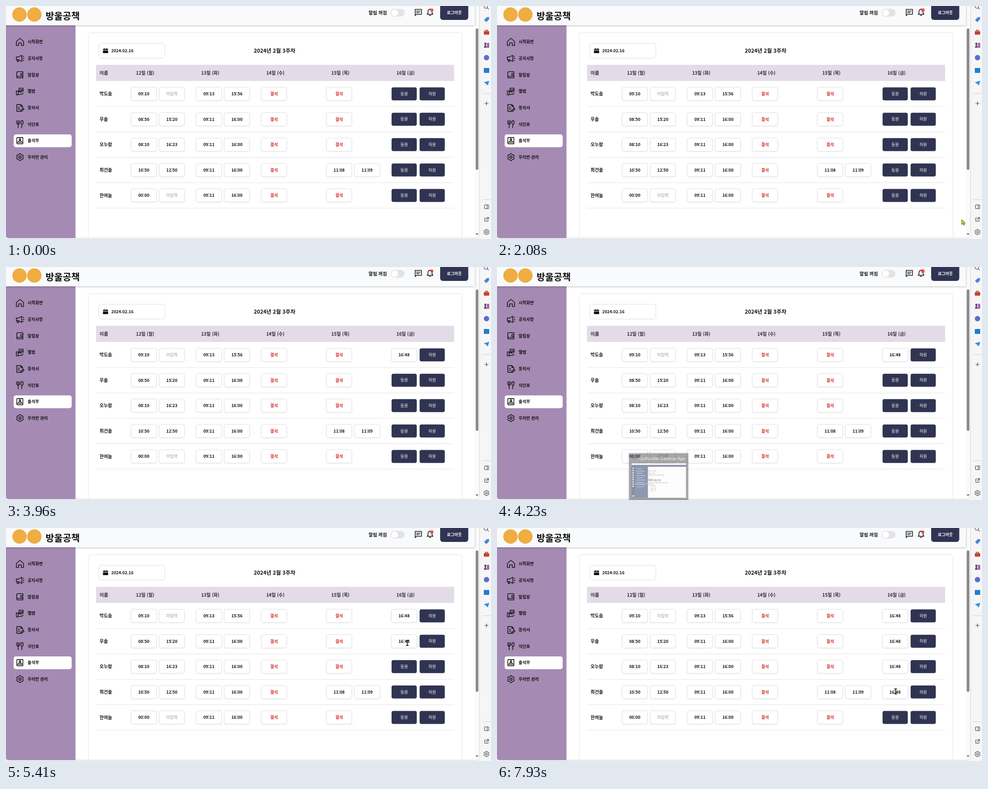
Animation, 1078 px wide and 519 px high, one loop 8 s. Source, as an HTML page:

```html
<!DOCTYPE html>
<html lang="ko">
<head>
<meta charset="utf-8">
<title>출석부</title>
<style>
  html, body { margin: 0; width: 100%; height: 100%; overflow: hidden; background: #fff; }
  svg { display: block; width: 1078px; height: 519px; }
  text { font: 700 9.2px "Noto Sans CJK KR", "Noto Sans CJK", sans-serif; fill: #111; }
  .mid { text-anchor: middle; }
  .icon { fill: none; stroke: #161616; stroke-width: 1.6; stroke-linecap: round; stroke-linejoin: round; }
  .thin { stroke-width: 1.1; }
  .box { fill: #fff; stroke: #dedee3; filter: drop-shadow(0 1px 1px #0001); }
  .dark { fill: #303452; }
  .line { stroke: #e4e4e8; }
  .tiny { font-size: 3px; fill: #555; font-weight: 400; }
  #ping { transform-box: fill-box; transform-origin: center; }
</style>
</head>
<body>
<svg viewBox="0 0 1078 519">
  <!-- window -->
  <rect width="1078" height="519" fill="#f6f6f7"/>
  <path d="M0 0H1052.5V511Q1052.5 517 1046 517H6Q0 517 0 511Z" fill="#fff" stroke="#d5d5d9"/>
  <rect x="1042" width="10" height="515" fill="#fafafa"/>
  <rect x="1044" y="50" width="6" height="315" rx="3" fill="#8b8b8b"/>
  <path d="M1043.5 506.500H1050.500L1047 510.500Z" fill="#777"/>
  <path d="M183 516.500V64.500Q183 59.500 188 59.500H1008.500Q1013.500 59.500 1013.500 64.500V516.500" fill="none" class="line"/>
  <path d="M0 43H154.500V517H6Q0 517 0 511Z" fill="#a58ab3"/>
  <rect x="-5" y="-5" width="1047" height="48" fill="#f8fafc" style="filter:drop-shadow(0 1px 2px #0004)"/>

  <!-- header -->
  <circle cx="30" cy="19" r="16" fill="#efad42"/>
  <circle cx="63" cy="19" r="16" fill="#efad42"/>
  <text x="88" y="30" style="font-size:20.7px">방울공책</text>
  <text x="806" y="18.500" style="font-size:10.3px">알림 꺼짐</text>
  <rect x="855" y="6.500" width="31" height="17" rx="8.500" fill="#e3e3e5"/>
  <circle cx="864" cy="15" r="8" fill="#fff" stroke="#ddd"/>
  <g class="icon">
    <path d="M909.500 21.500V7.500H923.500V18.500H912.500ZM912.500 11.500H920.500M912.500 14.800H918.500"/>
    <path d="M936 18.500H949L947 16V12Q947 7.500 942.500 7.500T938 12V16ZM940.500 20.800H944.500M942.500 6.500V7.500"/>
  </g>
  <circle cx="946.500" cy="9" r="3.300" fill="#e8463a"/>
  <circle id="ping" cx="946.500" cy="9" r="3.300" fill="#ee5548"/>
  <rect class="dark" x="965" y="-8" width="62.500" height="39" rx="6"/>
  <text class="mid" x="996.500" y="18" fill="#fff" style="fill:#fff;font-size:9px">로그아웃</text>

  <rect x="17" y="286" width="129" height="28.500" rx="5" fill="#fff"/>
  <g id="nav"></g>

  <!-- table head -->
  <rect x="206.500" y="83" width="146.500" height="33" rx="5" fill="#fff" stroke="#dcdce0"/>
  <path d="M215.500 96V95.500H218V94H219.500V95.500H223V94H224.500V95.500H227V98H215.500ZM215.500 99H227V105H215.500Z" fill="#161616"/>
  <text x="234" y="103.300">2024.02.16</text>
  <text class="mid" x="597" y="104.300" style="font-size:11.900px">2024년 2월 3주차</text>
  <rect x="200" y="131" width="796" height="36" fill="#e3dce8"/>
  <g id="table"></g>

  <!-- browser side bar -->
  <circle cx="1066.500" cy="1" r="4" class="icon" style="stroke:#6d6685"/>
  <path d="M1069.500 4L1072.500 7" class="icon" style="stroke:#6d6685"/>
  <path d="M1062.500 31L1068.500 25L1074 24.500L1073.500 30L1067.500 36Z" fill="#4a86dd"/>
  <path d="M1065.500 56V54H1070.500V56" class="icon" style="stroke:#9b3a2a"/>
  <rect x="1062" y="56" width="12" height="8" rx="1" fill="#cf4e35"/>
  <path d="M1062 59.500H1074" stroke="#8d2d20"/>
  <circle cx="1065.500" cy="84" r="2.500" fill="#5c5566"/>
  <path d="M1062 93L1064.500 86H1066.500L1069 93Z" fill="#5c5566"/>
  <path d="M1069 93V82H1074V93Z" fill="#b15cb0"/>
  <circle cx="1068" cy="115" r="6" fill="#5b6fc9"/>
  <rect x="1062" y="138" width="12" height="11" rx="1" fill="#1f7fd0"/>
  <path d="M1062 170L1074 166.500L1071 177L1067.500 173.500Z" fill="#2b8fe0"/>
  <path d="M1059 195H1078M1059 431.500H1078" stroke="#cfcfd3"/>
  <g class="icon thin" style="stroke:#3a3a3a">
    <path d="M1064 217H1072M1068 213V221"/>
    <rect x="1063.500" y="443" width="9.500" height="8.500" rx="1.500"/><path d="M1069.500 443V451.500"/>
    <path d="M1067 472H1065Q1064 472 1064 473V478.500Q1064 479.500 1065 479.500H1070.500Q1071.500 479.500 1071.500 478.500V476.500M1069 471H1072.500V474.500M1072.500 471L1067.500 476"/>
    <g id="sideGear"></g>
  </g>

  <g id="tip">
    <rect x="1057.500" y="511.500" width="30" height="14" fill="#fbfbfb" stroke="#dadada"/>
    <text x="1061" y="521" style="font-weight:400;fill:#777">정지</text>
  </g>

  <!-- task preview -->
  <g id="preview">
    <rect x="293.500" y="415" width="131.500" height="110" fill="#505050" style="filter:drop-shadow(0 0 2px #0006)"/>
    <circle cx="305" cy="426" r="4.600" fill="#1e4a8c"/>
    <text x="316" y="430" style="font:400 9.200px 'Open Sans',sans-serif;fill:#fff">Quillander Desktop App</text>
    <rect x="299" y="437" width="121" height="77" fill="#fdfdfd"/>
    <rect x="299" y="437" width="121" height="4" fill="#e4e8ef"/>
    <rect x="299" y="441" width="121" height="4" fill="#1d2c55"/>
    <rect x="299" y="445" width="36.500" height="69" fill="#203764"/>
    <rect x="299" y="445" width="7" height="69" fill="#172849"/>
    <rect x="306" y="481" width="29" height="4" fill="#3b578c"/>
    <circle cx="303" cy="510" r="1.800" fill="#fff"/>
    <path d="M335.500 453H414M335.500 469H414M335 500H416M335 510H416" stroke="#eee" stroke-width=".6"/>
    <g id="previewText"></g>
  </g>

  <g id="cursor" stroke="#15180a" stroke-linejoin="round">
    <path id="arrow" d="M0 0V11L2.700 8.500L4.600 12.500L6.400 11.600L4.600 7.800H8Z" fill="#c6e812" stroke-width=".8"/>
    <path id="hand" d="M-1 1Q0-.5 1 1V5L4.500 5.800Q6 6.300 5.800 8L5 12.500H-.5L-3.600 8Q-3.500 6.500-1 8Z" fill="#c6e812" stroke-width="1"/>
    <g id="beam" fill="none">
      <path d="M-3-5.500H3M-3 5.500H3M0-5.500V5.500" stroke="#25290c" stroke-width="2"/>
      <path d="M0-4V4" stroke="#a9bd2c" stroke-width=".6"/>
    </g>
  </g>
</svg>
<script>
const LOOP = 8000;
const $ = id => document.getElementById(id);
const text = (x, y, s, size = 9.2, cls = '', fill = '#111', weight = 700) =>
  `<text x="${x}" y="${y + size * .36}" class="${cls}" style="font-size:${size}px;fill:${fill};font-weight:${weight}">${s}</text>`;

function gear(cx, cy, r) {
  const points = Array.from({ length: 48 }, (_, i) => {
    const a = i / 48 * 2 * Math.PI, q = r * (.9 + .1 * Math.cos(6 * a));
    return `${cx + q * Math.sin(a)},${cy + q * Math.cos(a)}`;
  });
  return `<polygon points="${points.join(' ')}"/><circle cx="${cx}" cy="${cy}" r="${r * .33}"/>`;
}

// Icons are drawn around their own centre.
const book = 'M-5-7H6.500V7H-5Q-7 7-7 5V-5Q-7-7-5-7M-7 4.500Q-6.500 3.500-5 3.500H6.500';
const nav = [
  ['시작화면', '<path d="M-8-1L0-8L8-1V8H3V2H-3V8H-8Z"/>'],
  ['공지사항', '<path d="M-8-3H-3L4-7V7L-3 3H-8ZM-6 3V7H-3V3M6.500-4L8-5M7 0H9M6.500 4L8 5"/>'],
  ['알림장', `<path d="${book}M6.500-3H2V1H6.500"/>`],
  ['앨범', '<path d="M-8-1H-4V8H-8ZM-4 7H4L7 4M-4 1H1L3 3M-2-7H7V0H-2ZM0-2L2-4L4-2L7-5"/>'],
  ['동의서', '<path d="M0 8H-7V-7H2L6-3V0M2-7V-3H6M-4-1H-1M-4 3H0M1 7L7 1L9 3L4 8H1Z"/>'],
  ['식단표', '<path d="M-7-8V-3Q-7 0-4 0T-1-3V-8M-4-8V8M4 8V1M4 1Q2-1 2-4T4.500-8T7-4T4 1"/>'],
  ['출석부', `<path d="${book}M-3 1.500Q0-2 3 1.500"/><circle cy="-3" r="1.700"/>`],
  ['우리반 관리', gear(0, 0, 7.8)]
];
$('nav').innerHTML = nav.map(([label, icon], i) => {
  const y = 80 + i * 36.65;
  return `<g class="icon" transform="translate(31 ${y})">${icon}</g>` + text(48, y, label);
}).join('');
$('sideGear').innerHTML = gear(1068, 503.5, 6);

const colX = i => 278 + i * 144.7;
const rowY = i => 195.7 + i * 56.55;
const timeBox = (x, y, s) => {
  const [fill, weight] = s === '결석' ? ['#d92727', 700] : s === '미입력' ? ['#999', 400] : ['#111', 700];
  return `<rect class="box" x="${x}" y="${y - 14.7}" width="56.500" height="29.500" rx="4"/>` +
    text(x + 28.3, y, s, 9.2, 'mid', fill, weight);
};
const button = (x, y, s) =>
  `<rect class="dark" x="${x}" y="${y - 14.5}" width="56" height="29" rx="4"/>` + text(x + 28, y, s, 9, 'mid', '#fff', 500);

const absent = ['결석'];
const rows = [
  ['박도솜', ['09:10', '미입력'], ['09:13', '15:56'], absent, absent],
  ['우솔', ['08:50', '15:20'], ['09:11', '16:00'], absent, absent],
  ['오누람', ['08:10', '16:23'], ['09:11', '16:00'], absent, absent],
  ['최건솔', ['10:50', '12:50'], ['09:11', '16:00'], absent, ['11:08', '11:09']],
  ['한여늘', ['00:00', '미입력'], ['09:11', '16:00'], absent, absent]
];
const head = text(208, 149, '이름', 10.3, '', '#2b2833') +
  ['월', '화', '수', '목', '금'].map((d, i) => text(colX(i) + 11, 149, `${12 + i}일 (${d})`, 10, '', '#2b2833')).join('');
$('table').innerHTML = head + rows.map(([name, ...days], r) => {
  const y = rowY(r);
  const cells = days.map((day, c) => day.map((s, k) => timeBox(colX(c) + k * 62.3, y, s)).join('')).join('');
  return `<path class="line" d="M200 ${y + 28.3}H996"/>` + text(208, y, name, 10) + cells +
    `<g id="in${r}">${button(857, y, '등원')}</g><g id="done${r}">${timeBox(856.5, y, '16:48')}</g>` +
    button(919.3, y, '하원');
}).join('');

const tiny = (x, y, s) => `<text class="tiny" x="${x}" y="${y}">${s}</text>`;
const side = Array.from({ length: 9 }, (_, i) =>
  `<rect x="301" y="${447 + i * 5}" width="3" height="3" fill="#ccd4e4"/><rect x="310" y="${449 + i * 5}" width="${13 + i * 5 % 9}" height="1" fill="#a8b6d2"/>`);
$('previewText').innerHTML = side.join('') +
  tiny(336, 456, '알림 안내 내용') + tiny(336, 461, '오늘의 공지') + tiny(336, 465, '내용을 확인하고 답해 주세요') +
  tiny(336, 473, '새 소식') + text(336, 476, '이번주 할일 안내', 4) +
  tiny(336, 482, '아래 목록을 차례대로 확인해 주세요') + tiny(336, 486, '감사합니다') +
  [490, 494.5, 499].map(y => tiny(340, y, '• 확인 목록')).join('');

// Timeline helpers
const play = (el, frames) => el.animate(
  frames.map(([t, props]) => ({ offset: t / LOOP, ...props })),
  { duration: LOOP, iterations: Infinity }).startTime = 0;

function show(el, ...spans) {
  const frames = [[0, 0]];
  for (const [from, to] of spans) {
    if (from === 0) frames[0][1] = 1; else frames.push([from, 1]);
    if (to < LOOP) frames.push([to, 0]);
  }
  frames.push([LOOP, frames.at(-1)[1]]);
  play(el, frames.map(([t, opacity]) => [t, { opacity, easing: 'step-end' }]));
}

const clicks = [3000, 5330, 6480, 7780, LOOP];
clicks.forEach((t, r) => {
  show($('in' + r), [0, t]);
  if (t < LOOP) show($('done' + r), [t, LOOP]);
  else $('done' + r).remove();
});

show($('tip'), [1100, 1940]);
play($('preview'), [[0, 0], [4160, 0], [4300, 1], [5000, 1], [5150, 0], [LOOP, 0]].map(([t, opacity]) => [t, { opacity }]));

const path = [
  [0, 1072, 530], [1940, 1072, 530], [2200, 1000, 430], [2500, 905, 240], [2680, 886, 192],
  [3260, 886, 192], [3500, 780, 300], [3900, 338, 530], [4450, 338, 530], [4860, 892, 262],
  [5200, 892, 262], [5330, 892, 256], [5830, 892, 256], [6200, 892, 305], [6640, 892, 308],
  [7100, 893, 320], [7440, 894, 335], [7700, 886, 364], [LOOP, 886, 364]
];
play($('cursor'), path.map(([t, x, y]) => [t, { transform: `translate(${x}px, ${y}px)` }]));
show($('arrow'), [1940, 2680], [3280, 4800], [5950, 6150], [6950, 7520]);
show($('hand'), [2680, 2850], [4800, 5330], [6150, 6480], [7520, 7800]);
show($('beam'), [2850, 3280], [5330, 5950], [6480, 6950], [7800, LOOP]);

$('ping').animate([
  { transform: 'scale(1)', opacity: 1, easing: 'cubic-bezier(0,0,.2,1)' },
  { transform: 'scale(2)', opacity: 0, offset: .75 },
  { transform: 'scale(2)', opacity: 0 }
], { duration: 1000, iterations: Infinity }).startTime = -900;
</script>
</body>
</html>
```
